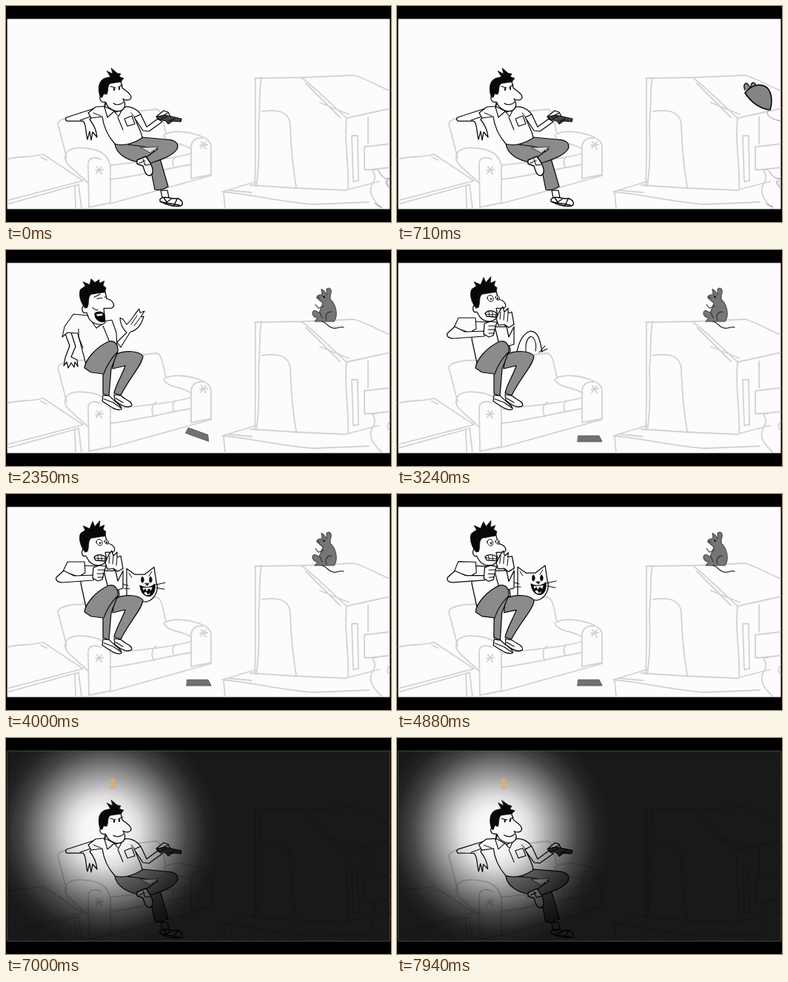
These frames come from a looping animation (520 by 293 pixels, 8 s). An HTML page:

```html
<!DOCTYPE html>
<html lang="en">
<head>
<meta charset="utf-8">
<title>Couch scene</title>
<style>
  html, body { margin: 0; width: 100%; height: 100%; overflow: hidden; background: #000; }
  svg { display: block; width: 100vw; height: 100vh; }
  path { stroke-linecap: round; stroke-linejoin: round; }
  text { font: bold 17.5px "DejaVu Serif", "Noto Serif", serif; fill: #dfae66; stroke: #dfae66; stroke-width: .8px; }
</style>
</head>
<body>
<svg id="stage" viewBox="0 0 520 293">
  <defs>
    <clipPath id="frame"><rect x="1.6" y="17.5" width="516.8" height="258"/></clipPath>
    <radialGradient id="spot" gradientUnits="userSpaceOnUse" cx="133" cy="127" r="155">
      <stop offset="0" stop-opacity="0"/>
      <stop offset=".2" stop-opacity=".03"/>
      <stop offset=".32" stop-opacity=".13"/>
      <stop offset=".5" stop-opacity=".4"/>
      <stop offset=".72" stop-opacity=".72"/>
      <stop offset=".88" stop-opacity=".86"/>
      <stop offset="1" stop-opacity=".9"/>
    </radialGradient>
  </defs>
  <rect width="520" height="293"/>
  <g clip-path="url(#frame)">
    <rect width="520" height="293" fill="#fdfbfe"/>
    <g id="scene"></g>
    <g id="night">
      <rect width="520" height="293" fill="url(#spot)"/>
      <text x="144" y="67.7" text-anchor="middle">1</text>
    </g>
  </g>
</svg>
<script>
const PAPER = '#fdfbfe', INK = '#080808', GREY = '#8b8b8b', PALE = '#d3d1d4';
const LOOP = 8000, BEAT = 176.5;
const scene = document.getElementById('scene');
const night = document.getElementById('night');

function random(seed) {
  return () => (seed = (seed * 16807) % 2147483647) / 2147483647;
}

// Redraws a path with a slightly unsteady hand.
function wobble(d, rand, amount) {
  return d.replace(/\d+(\.\d+)?/g, n => (+n + (rand() - .5) * amount).toFixed(1));
}

// A drawing is a list of [path, fill, stroke width, stroke].
function draw(shapes, seed = 0, amount = 1) {
  const group = document.createElementNS('http://www.w3.org/2000/svg', 'g');
  const rand = random(seed * 7919 + 1);
  for (const [d, fill = 'none', width = 1.25, stroke = INK] of shapes) {
    const path = document.createElementNS(group.namespaceURI, 'path');
    path.setAttribute('d', seed ? wobble(d, rand, amount) : d);
    path.setAttribute('fill', fill);
    path.setAttribute('stroke', stroke);
    path.setAttribute('stroke-width', width);
    group.append(path);
  }
  return scene.appendChild(group);
}

const variants = (shapes, count, amount) =>
  Array.from({ length: count }, (_, i) => draw(shapes, i, amount));

const star = (x, y) =>
  `M${x - 5} ${y}L${x + 5} ${y - 1}M${x - 3} ${y - 5}L${x + 3} ${y + 5}M${x + 3} ${y - 5}L${x - 4} ${y + 4}`;

const room = [
  // sofa
  'M82 206L71 164C67 156 76 153 86 151C98 148 114 151 128 148L203 140C211 141 212 157 216 173',
  'M80 203C83 191 99 191 116 194C132 197 140 207 141 218L141 267L112 273L111 216C110 205 121 204 128 208',
  'M80 203C78 211 85 216 90 221L111 240',
  'M215 174C226 168 246 170 262 176C272 180 277 184 277 192L277 229L250 234L250 195C249 184 255 178 266 179',
  'M213 175C217 187 237 185 250 194M141 216C180 211 220 209 250 200',
  'M141 235C178 231 220 220 250 215M203 206C195 211 197 222 200 226M229 204C224 208 225 215 227 219',
  'M141 268L277 230',
  star(126, 223), star(267, 189),
  // table
  'M1 208C18 203 34 206 50 201L104 237L1 264M1 269L98 242L102 275M93 244L94 275M47 205L55 209',
  // television
  'M336 98L399 97L470 94C486 98 500 108 519 115M399 97C417 110 441 135 460 152L519 139',
  'M345 97C341 120 344 135 341 160C342 190 342 220 338 244M337 99C336 145 338 200 336 242',
  'M330 243L391 247L460 250',
  'M346 143C370 139 384 145 384 163C385 194 388 223 392 246',
  'M405 105L451 151M424 131L463 147M460 152C456 184 464 219 462 249L504 238',
  'M467 176L475 176L476 237L469 238ZM519 187L484 191L484 222L501 222M489 151L489 187',
  'M292 252L338 238M292 252C335 256 372 266 416 269L490 266M294 254L296 276M301 250L332 253',
  // vase
  'M492 222L519 219M494 222C499 228 500 234 495 241C488 254 497 264 507 274M519 231C513 239 516 243 519 246'
].map(d => [d, 'none', 1.8, PALE]);

const tailByVase = [
  ['M503 223C507 230 510 236 519 234M515 236C510 239 516 244 518 247M498 267C500 270 504 272 507 273', 'none', 1, '#8f8d90']
];

const sitting = [
  // far leg and sandal
  ['M209 250L211 260L220 260L218 250Z', PAPER],
  ['M208 262C214 256 225 263 232 261C239 264 240 269 236 271C226 273 216 269 208 265Z', PAPER, 1.4],
  ['M213 260L217 266L223 262M227 270L231 262M210 266L234 270', 'none', 1.4],
  ['M147 187C149 201 164 210 181 212L194 214L201 249C207 251 214 248 219 245L208 207L190 185Z', GREY],
  ['M165 188L184 178L216 181C229 181 234 187 231 194C225 204 207 209 193 214C190 211 189 207 191 204L205 194L181 190Z', GREY],
  ['M182 192L206 191L195 199Z', '#d8d6d9', .6],
  ['M177 209L189 204L195 213C199 221 200 228 194 230C188 230 187 223 185 217L177 214Z', PAPER, 1.4],
  ['M185 208L188 216L195 215M180 213L188 210', 'none', 1.2],
  // arm on the sofa
  ['M119 139L82 151C79 153 81 157 85 156L104 156C109 161 107 170 110 181L113 170L115 182L117 171L123 178C122 168 118 160 113 154L117 149Z', PAPER],
  ['M100 155L117 149', 'none', 1.1],
  // torso
  ['M133 136L121 137L111 145L115 152L130 150C132 165 139 178 147 187C160 191 175 185 184 179C183 169 176 161 174 151L182 147C177 140 167 134 158 138L149 144Z', PAPER],
  ['M133 137L137 151L146 143L152 150L158 138M151 151L158 168M160 153L170 149L174 160L164 163Z', 'none', 1.1],
  ['M118 145L128 149M174 151L169 145', 'none', 1],
  // head
  ['M135 105L155 102L157 111C161 115 169 118 169 124C168 129 161 128 158 126C165 137 157 145 147 142C140 140 136 135 135 131L133 138L134 130C127 132 125 124 129 121Z', PAPER],
  ['M127 123C123 110 126 101 133 98L141 96L136 88L144 92L142 84L150 91L155 92L153 96L159 98L155 103L141 105C136 109 139 115 136 120L132 119L130 124Z', INK, .6],
  ['M141 109L148 111M152 110L157 107M145 132C149 135 156 134 159 130', 'none', 1.2],
  ['M146 112L146 114M153 111L153 113', 'none', 2],
  // arm with the remote
  ['M173 151L182 147L190 164L205 153L211 157L193 170L185 169Z', PAPER],
  ['M203 150L213 142L219 144L222 150L218 153L206 154Z', PAPER],
  ['M204 150L215 148L237 153L236 157L225 156L219 160L216 156L207 154Z', '#454545', 1.2],
  ['M209 150L219 145M210 153L217 150M220 156L228 153', 'none', 1.1]
];

const trousers = [
  ['M147 142C162 135 180 137 185 144C184 156 166 174 155 197L146 194C149 181 157 170 161 157L144 161Z', GREY],
  ['M106 160C107 149 122 131 139 124C147 122 152 129 151 138L142 161L139 198L131 195L131 168L115 166Z', GREY],
  ['M150 139C143 146 137 154 132 168', 'none', 1.1],
  ['M131 197L140 198C145 205 157 210 156 216C150 219 142 213 130 205Z', PAPER],
  ['M146 196L156 198C160 203 171 205 170 211C164 215 155 211 147 204Z', PAPER],
  ['M132 202L145 207L155 214M148 201L158 207', 'none', 1.1]
];

const hair = 'M104 75C99 67 98 57 101 53L107 49L104 43L113 47L115 39L120 44L126 40L126 45L133 42L131 48L135 51L134 57L115 60C110 64 113 71 110 78L107 79Z';

const startled = [
  ['M150 125L163 112C157 106 154 98 154 92L158 94L163 101C170 95 174 86 180 80L181 85L187 83L182 91L186 90C183 101 177 109 168 111L155 132Z', PAPER, 1.1],
  ['M169 101L177 89M173 103L181 92', 'none', 1],
  ['M79 111L86 130L80 146L78 157L82 152L84 160L88 153L92 159L93 152L97 158L96 149L88 145L94 131L88 112Z', PAPER],
  ['M112 89L91 87L79 104L76 118L83 112L97 113L108 155L150 130L149 112L143 95L131 97Z', PAPER, 1.1],
  ['M98 107L98 118L104 133M112 91L122 106L129 101M131 103L140 125', 'none', 1.1],
  ...trousers,
  ['M112 60L134 57L136 66C145 68 149 77 142 79L132 79L134 98C131 103 118 102 112 93L109 85C103 87 101 80 105 75Z', PAPER],
  [hair, INK, .6],
  ['M120 86C123 83 130 83 133 87L133 97C128 99 119 95 120 86Z', INK, 1],
  ['M122 87L130 86L131 89L123 90Z', PAPER, .5],
  ['M123 66L130 65M133 64L136 64M119 64L127 60M117 78C120 82 122 82 124 81', 'none', 1.1]
];

const scared = [
  ['M105 97L101 121L109 158L153 138L151 119L145 99Z', PAPER],
  ['M132 104L148 104L151 118L158 104L158 128L147 131L138 128Z', PAPER],
  ...trousers,
  ['M106 92L83 92L77 105L98 112L107 107Z', PAPER, 1.1],
  ['M78 104L68 113C66 118 72 120 76 120L118 117L119 110L92 111Z', PAPER],
  ['M111 59L134 56L137 67C146 68 150 77 144 79L134 79L136 89C132 99 119 99 112 91L108 84C102 86 101 78 105 74Z', PAPER],
  [hair.replace('115 39', '117 37').replace('126 40', '127 36'), INK, .6],
  ['M122 65C122 60 130 60 130 66C130 72 123 71 122 65ZM133 64C134 60 140 63 138 67C137 69 134 68 133 64Z', PAPER, 1],
  ['M127 66L127 67M136 65L136 66', 'none', 1.8],
  ['M119 86C123 81 130 82 134 85L134 91L121 90Z', PAPER, 1.3],
  ['M124 84L125 90M129 84L129 90M120 87L134 88M120 59L126 57', 'none', .9],
  ['M118 100L126 97L135 98L133 104L130 116L124 118L117 114Z', PAPER],
  ['M124 103L133 103M123 108L132 108M124 113L131 113', 'none', 1],
  ['M134 93L139 82L143 77L145 84L150 79L150 86L155 84L158 101L151 105L145 101L137 102Z', PAPER],
  ['M140 84L139 94M145 85L144 95M150 87L149 97', 'none', 1]
];

const catRising = [
  ['M162 139C164 126 170 113 180 110C191 110 193 122 196 138', PAPER],
  ['M174 138C173 122 179 114 184 119C188 124 188 132 187 137M192 139L200 130M195 138L203 134', 'none', 1.1]
];

const cat = [
  ['M163 139L163 99L174 107L187 107L200 97L203 117C207 128 201 141 190 144C178 144 169 141 163 139Z', PAPER],
  ['M166 105L170 111M197 103L193 109M202 121L215 118M203 125L214 127M165 122L158 120M167 126L160 126', 'none', 1],
  ['M184 110C187 110 187 118 184 118C182 118 182 110 184 110ZM195 110C198 110 198 118 195 118C193 118 193 110 195 110Z', INK, .6],
  ['M188 119L193 119L191 122Z', INK, .8],
  ['M181 122C188 126 196 125 201 120C202 132 197 138 190 136C184 134 182 129 181 122Z', INK],
  ['M184 125L186 129L188 126L190 130L193 126L196 129L198 124ZM186 132L189 130L192 134L195 131L194 135L189 135Z', PAPER, .4]
];

const ratCrouched = [
  ['M415 90C412 83 415 79 419 82L423 88M423 86C423 78 429 78 430 86Z', '#8a888b', 1.3],
  ['M415 94C423 83 436 80 445 87C452 94 452 108 449 117C434 115 423 106 415 94Z', '#858386', 1.7],
  ['M448 117C441 122 449 129 459 131C468 134 475 128 481 132', 'none', .9, '#89878a']
];

const ratSitting = [
  ['M427 61L426 53L430 56L433 61L433 53C438 50 441 54 438 62L438 67C446 74 449 89 443 97L417 97L421 92C413 91 412 83 417 82L423 85L428 72L420 65C419 62 423 60 427 61Z', '#777578', 1.1, '#4a484b'],
  ['M429 76L422 79L418 74M440 84C434 83 430 89 433 95M421 64L424 65M424 85L427 92', 'none', 1.2, '#343235'],
  ['M429 63L430 64', 'none', 1.8]
];
const ratTail = [['M427 97C435 99 434 105 442 106C448 107 451 103 456 105', 'none', 1.2]];

draw(room);
const vaseTails = variants(tailByVase, 2, 2);
const crouchers = variants(ratCrouched, 2);
const rat = draw(ratSitting);
const tail = draw(ratTail);
const remote = draw([['M-15 -4L13 -4L17 4L-16 4Z', '#727073', 1, '#5c5a5d']]);
const risingCat = draw(catRising);
const grinningCat = draw(cat);
const sitters = variants(sitting, 2, 1.1);
const jumpers = variants(startled, 2, 1.6);
const shakers = variants(scared, 3, 1.1);

const show = (node, on) => node.style.display = on ? '' : 'none';
const showOne = (nodes, index) => nodes.forEach((node, i) => show(node, i === index));
const clamp = x => Math.max(0, Math.min(1, x));
const place = (node, x, y, turn = 0) =>
  node.setAttribute('transform', `translate(${x} ${y}) rotate(${turn})`);

// [time, x, y, angle]
const remoteSteps = [
  [1820, 238, 178, -25], [2000, 253, 215, 55], [2120, 258, 252, 5],
  [2350, 259, 250, 20], [2650, 261, 253, 10], [2820, 260, 256, 0]
];
// [time, x, y] relative to the crouch on top of the set
const ratSteps = [[710, 55, 24], [880, 42, 14], [1060, 22, 4], [1180, 8, -2], [1235, 0, 0]];
const stepAt = (steps, t) => steps.filter(step => step[0] <= t).pop() || steps[0];

function render(t) {
  const dark = t >= 5940;
  const relaxed = t < 1820 || dark;
  const beat = Math.floor((dark ? t - 5940 : t) / BEAT);
  const fastBeat = Math.floor(Math.min(t, 5410) / 88);

  show(night, dark);
  showOne(sitters, relaxed ? beat % 2 : -1);
  sitters.forEach(node => place(node, 0, t >= 1710 && t < 1820 ? 3 : 0));

  showOne(jumpers, t >= 1820 && t < 2530 ? (t >= 2350 ? 0 : fastBeat % 2) : -1);
  jumpers.forEach(node => place(node, 0, t < 2000 ? 7 : 0));
  showOne(shakers, t >= 2530 && !dark ? fastBeat % 3 : -1);

  showOne(vaseTails, t < 1710 ? (t < 710 ? beat % 2 : 1) : -1);
  const [, rx, ry] = stepAt(ratSteps, t);
  showOne(crouchers, t >= 710 && t < 1410 ? beat % 2 : -1);
  crouchers.forEach(node => place(node, rx, ry));

  const ratUp = t >= 1410 && !dark;
  show(rat, ratUp);
  show(tail, ratUp);
  place(rat, 0, t >= 1530 && t < 1710 ? -1 : 0);
  place(tail, 0, t < 2300 && beat % 2 ? -2 : 0);

  show(remote, t >= 1820 && !dark);
  place(remote, ...stepAt(remoteSteps, t).slice(1));

  show(risingCat, t >= 2900 && t < 3710);
  place(risingCat, 0, 12 * (1 - clamp((t - 2900) / 300)));
  show(grinningCat, t >= 3710 && !dark);
  const rise = clamp(Math.floor((t - 3710) / 88) / 5);
  place(grinningCat, 0, 14 * (1 - rise) ** 2);
}

function tick() {
  render(performance.now() % LOOP);
  requestAnimationFrame(tick);
}
tick();
</script>
</body>
</html>
```
